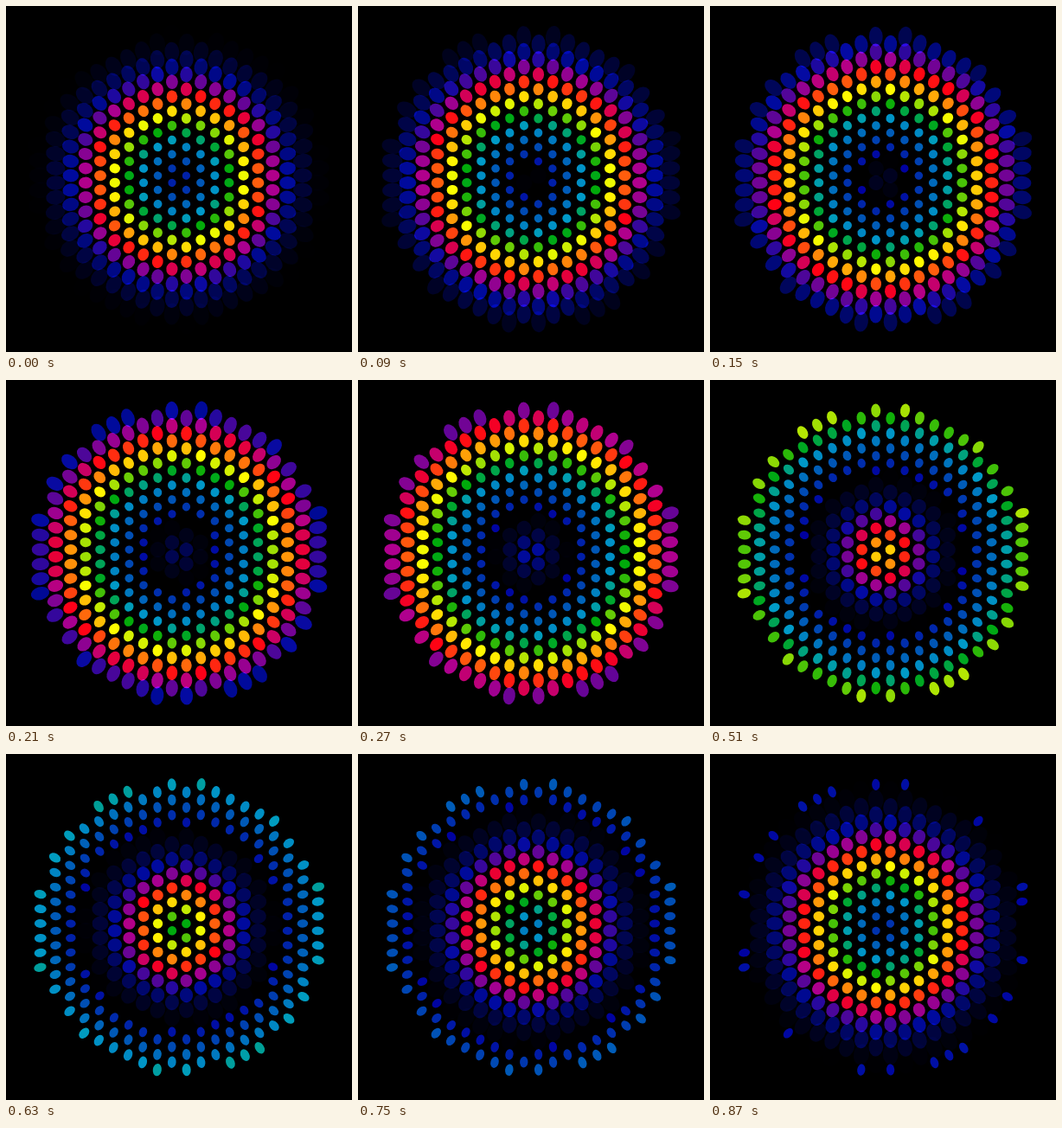
These frames come from a looping animation (400 px wide and 400 px high, 0.9 s). An HTML page with a canvas:

```html
<!DOCTYPE html>
<html lang="en">
<head>
<meta charset="utf-8">
<title>Rainbow dot pulse</title>
<style>
html, body { margin: 0; height: 100%; overflow: hidden; background: #000; }
canvas { display: block; width: 100vw; height: 100vh; }
</style>
</head>
<body>
<canvas id="stage" width="400" height="400"></canvas>
<script>
const ctx = document.getElementById('stage').getContext('2d');
const LOOP = 900, STEP = 30, RADIUS = 9.95, CENTER = 200.2, FADE_IN = .25;

// Key colours over a dot's life
const KEYS = [
  { at: FADE_IN, rgb: [0, 10, 162] },
  { at: .345, rgb: [175, 0, 142] },
  { at: .392, rgb: [255, 0, 20] },
  { at: .54, rgb: [255, 255, 0] },
  { at: .642, rgb: [0, 170, 10] },
  { at: .725, rgb: [0, 155, 200] },
  { at: 1, rgb: [0, 0, 160] }
];

function colorAt(phase) {
  const i = Math.max(1, KEYS.findIndex(key => key.at >= phase));
  const from = KEYS[i - 1], to = KEYS[i];
  const mix = Math.max(0, (phase - from.at) / (to.at - from.at));
  return `rgb(${from.rgb.map((c, n) => Math.round(c + (to.rgb[n] - c) * mix))})`;
}

// Staggered columns inside a disc, spread and stretched towards the rim
const dots = [];
for (let col = -10; col < 10; col++) {
  for (let row = -10; row <= 10; row++) {
    const u = col + .5, v = row + (col % 2 ? .25 : -.25), r = Math.hypot(u, v);
    if (r > RADIUS) continue;
    const spacing = 16.43 + .005 * r * r;
    dots.push({
      x: CENTER + u * spacing,
      y: CENTER + v * spacing,
      angle: Math.atan2(v, u),
      stretch: 1 + .0045 * r * r,
      delay: r / RADIUS
    });
  }
}

function draw(time) {
  ctx.clearRect(0, 0, 400, 400);
  ctx.globalCompositeOperation = 'lighter';
  for (const dot of dots) {
    const phase = (time / LOOP - dot.delay + 1) % 1;
    const size = 4.6 + 5 * (1 - phase) ** 2;
    ctx.globalAlpha = Math.min(1, (phase / FADE_IN) ** 2);
    ctx.fillStyle = colorAt(phase);
    ctx.beginPath();
    ctx.ellipse(dot.x, dot.y, size * dot.stretch, size, dot.angle, 0, Math.PI * 2);
    ctx.fill();
  }
}

function tick() {
  draw(Math.floor(performance.now() % LOOP / STEP) * STEP);
  requestAnimationFrame(tick);
}
tick();
</script>
</body>
</html>
```
